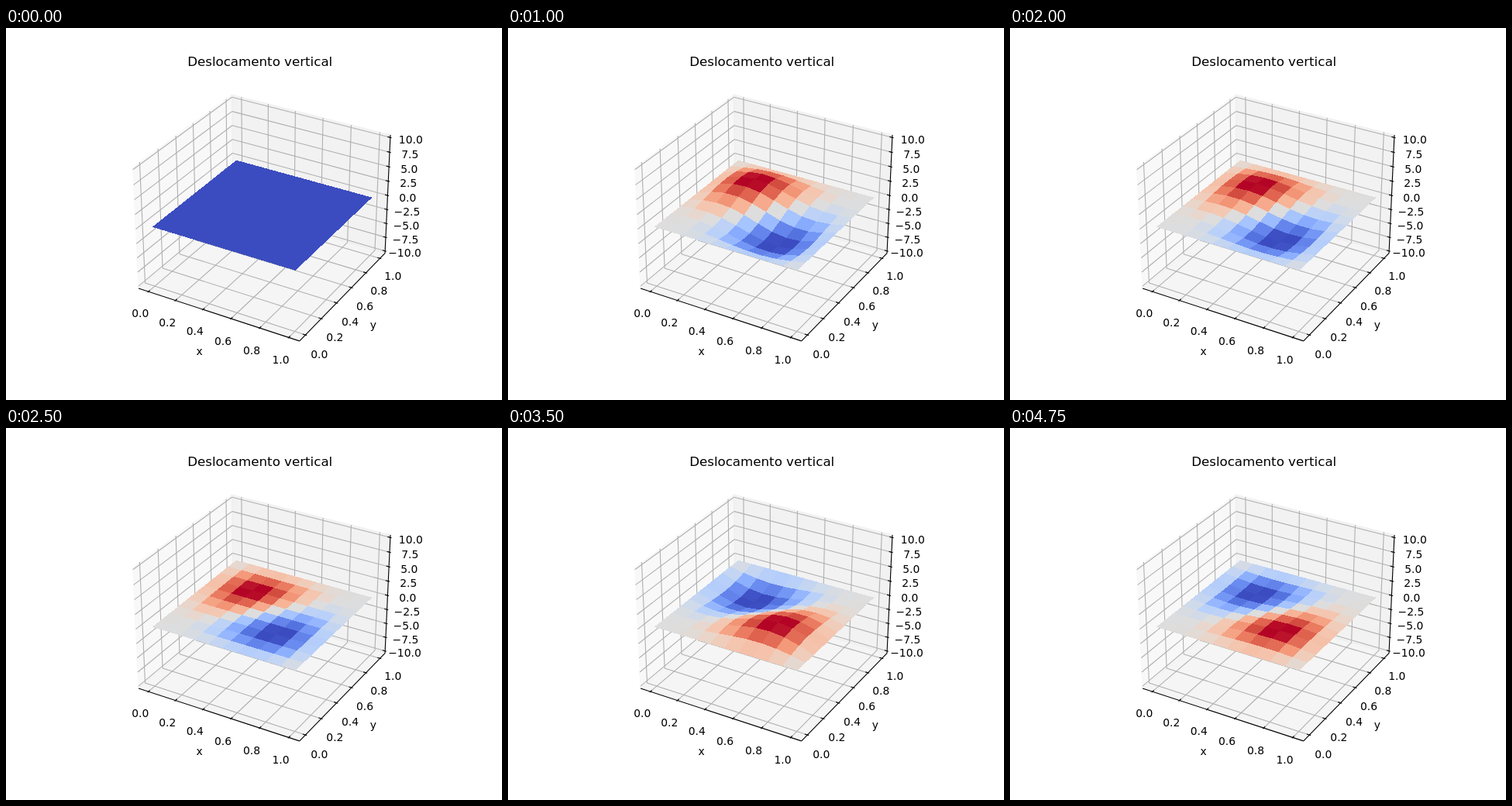
Write an HTML page that moves like this. It is 640 px wide and 480 px high and loops after 5 s.

```html
<!DOCTYPE html>
<html lang="pt">
<head>
<meta charset="utf-8">
<style>
  html, body { margin: 0; width: 100%; height: 100%; overflow: hidden; background: #fff; }
  svg { display: block; }
  text { font-family: "DejaVu Sans", sans-serif; font-size: 13.89px; text-anchor: middle; }
  #title { font-size: 16.67px; }
  #frame line { stroke-width: 1.11; }
</style>
</head>
<body>
<svg width="640" height="480" viewBox="0 0 640 480">
  <g id="frame"></g>
  <g id="surface" shape-rendering="crispEdges"></g>
  <text id="title" x="327.7" y="49">Deslocamento vertical</text>
</svg>
<script>
const SVG = "http://www.w3.org/2000/svg";
const frame = document.getElementById("frame");
const surface = document.getElementById("surface");

function add(parent, tag, attrs, text = "") {
  const node = document.createElementNS(SVG, tag);
  for (const name in attrs) node.setAttribute(name, attrs[name]);
  node.textContent = text;
  return parent.appendChild(node);
}

// Perspective camera: elevation 30°, azimuth -60°, distance 10.
const C = Math.sqrt(3) / 2;
const depth = ([x, y, z]) => C / 2 * x - 0.75 * y + 0.5 * z;
function project(p) {
  const [x, y, z] = p, scale = 1997.84 / (10 - depth(p));
  return [332.99 + scale * (C * x + 0.5 * y),
          237.4 - scale * (-0.25 * x + C / 2 * y + C * z)];
}
const points = corners => corners.map(p => project(p).map(v => v.toFixed(2)).join()).join(" ");

// Box half sizes and data-to-box conversions.
const H = 25 / 42, V = 25 / 56;
const plane = v => (v - 0.5) * 8 / 7 / 1.1;
const height = v => v * 3 / 70;
const STEP = 2 / 21, STEP_Z = 1 / 14;

function line(a, b, stroke) {
  const [x1, y1] = project(a), [x2, y2] = project(b);
  add(frame, "line", { x1, y1, x2, y2, stroke });
}
function label(p, text, baseline) {
  const [x, y] = project(p);
  add(frame, "text", { x: x.toFixed(1), y: Math.round(y + baseline) }, text);
}
function pane(corners, color) {
  add(frame, "polygon", { points: points(corners), fill: color, stroke: color,
                          "stroke-width": 1.39, opacity: 0.5 });
}

function drawFrame() {
  pane([[-H, -H, -V], [-H, H, -V], [-H, H, V], [-H, -H, V]], "#f2f2f2");
  pane([[-H, H, -V], [H, H, -V], [H, H, V], [-H, H, V]], "#e6e6e6");
  pane([[-H, -H, -V], [H, -H, -V], [H, H, -V], [-H, H, -V]], "#ececec");

  const unitTicks = [0, 0.2, 0.4, 0.6, 0.8, 1];
  const unitText = v => v.toFixed(1);
  const tick = 1.0372, name = 2.2548;
  const axes = [
    { ticks: unitTicks, place: plane, text: unitText, name: "x",
      wall: c => [[c, -H, -V], [c, H, -V], [c, H, V]],
      edge: (c, out, drop = 0) => [c, -H - out * STEP, -V - drop * STEP_Z], end: H },
    { ticks: unitTicks, place: plane, text: unitText, name: "y",
      wall: c => [[H, c, -V], [-H, c, -V], [-H, c, V]],
      edge: (c, out, drop = 0) => [H + out * STEP, c, -V - drop * STEP_Z], end: H },
    { ticks: Array.from({ length: 9 }, (_, i) => i * 2.5 - 10), place: height,
      text: v => v.toFixed(1).replace("-", "\u2212"),
      wall: c => [[-H, -H, c], [-H, H, c], [H, H, c]],
      edge: (c, out, drop = 0) => [H + out * STEP, H + drop * STEP, c], end: V },
  ];
  for (const axis of axes) {
    const spots = axis.ticks.map(axis.place);
    for (const c of spots) {
      const [a, b, d] = axis.wall(c);
      line(a, b, "#b0b0b0");
      line(b, d, "#b0b0b0");
    }
    line(axis.edge(-axis.end, 0), axis.edge(axis.end, 0), "#000");
    spots.forEach((c, i) => {
      line(axis.edge(c, 0.1), axis.edge(c, -0.2), "#000");
      label(axis.edge(c, tick, tick), axis.text(axis.ticks[i]), 11);
    });
    if (axis.name) label(axis.edge(0, name, name), axis.name, 4);
  }
}

// Diverging blue-grey-red scale, evenly spaced stops.
const STOPS = [
  [59, 76, 192], [77, 104, 215], [98, 130, 234], [119, 154, 247], [141, 176, 254],
  [163, 194, 255], [184, 208, 249], [204, 217, 238], [221, 221, 221], [236, 211, 197],
  [245, 196, 173], [247, 177, 148], [244, 154, 123], [236, 127, 99], [222, 96, 77],
  [203, 62, 56], [180, 4, 38]];
function color(v) {
  const s = v * (STOPS.length - 1), i = Math.min(Math.floor(s), STOPS.length - 2);
  return `rgb(${STOPS[i].map((a, k) => Math.round(a + (STOPS[i + 1][k] - a) * (s - i)))})`;
}

const N = 10, AMPLITUDE = 1.4, FRAMES = 20, FRAME_MS = 250;
const { sin, PI } = Math;
const mode = (x, y) => sin(2 * PI * x) * sin(PI * y) - sin(PI * x) * sin(2 * PI * y);
const mean = values => values.reduce((a, b) => a + b) / values.length;
const polygons = Array.from({ length: N * N }, () => add(surface, "polygon", {}));

function drawSurface(step) {
  const amplitude = AMPLITUDE * sin(2 * PI * step / FRAMES);
  const node = (i, j) => [plane(i / N), plane(j / N), height(amplitude * mode(i / N, j / N))];
  const cells = polygons.map((_, n) => {
    const i = n % N, j = Math.floor(n / N);
    const corners = [node(i, j), node(i + 1, j), node(i + 1, j + 1), node(i, j + 1)];
    return { corners, level: mean(corners.map(p => p[2])), depth: mean(corners.map(depth)) };
  });
  const levels = cells.map(c => c.level);
  const low = Math.min(...levels), range = Math.max(...levels) - low;
  cells.sort((a, b) => a.depth - b.depth).forEach((cell, n) => {
    polygons[n].setAttribute("points", points(cell.corners));
    polygons[n].setAttribute("fill", color(range ? (cell.level - low) / range : 0));
  });
}

let shown = -1;
function tickClock() {
  const step = Math.floor(performance.now() / FRAME_MS) % FRAMES;
  if (step !== shown) drawSurface(shown = step);
  requestAnimationFrame(tickClock);
}

drawFrame();
tickClock();
</script>
</body>
</html>
```
